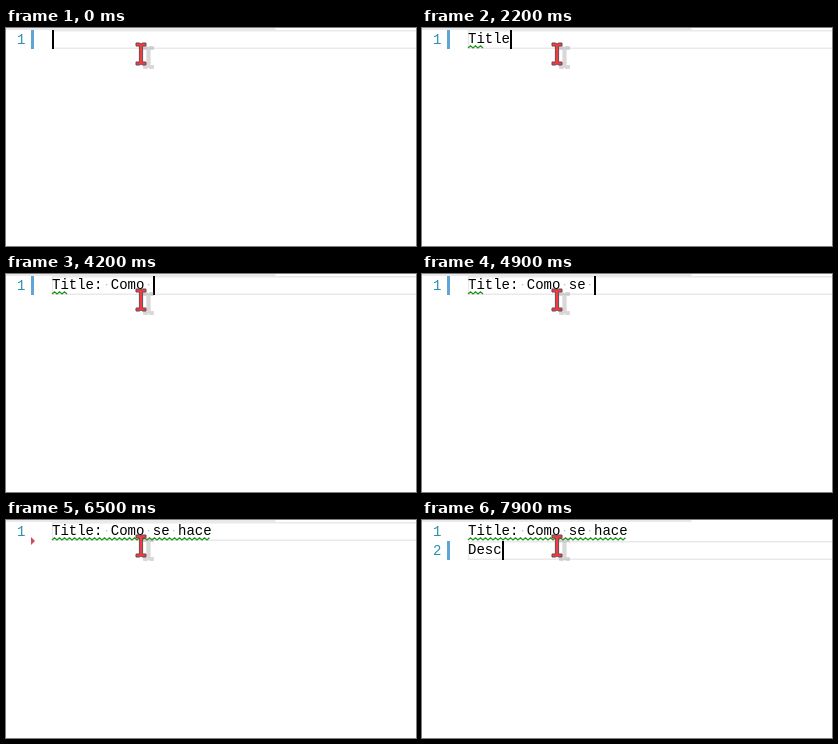
Recreate the animation shown at these times as an HTML page. Size 410x218 px, loop 8 s.

```html
<!DOCTYPE html>
<html lang="en">
<head>
<meta charset="utf-8">
<style>
  html, body { margin: 0; width: 100%; height: 100%; overflow: hidden; background: #fff; }
  svg { display: block; width: 100vw; height: 100vh; }
  text { font: 14px "Liberation Mono", monospace; white-space: pre; }
  .num { fill: #2b91af; }
</style>
</head>
<body>
<svg viewBox="0 0 410 218">
  <defs>
    <path id="beam" d="M0 0H3.5L5 1L6.500 0H10V3H6.600V19H10V22H6.500L5 21L3.500 22H0V19H3.400V3H0Z"/>
  </defs>
  <rect width="410" height="218" fill="#fff"/>
  <rect width="269.500" height="2" fill="#e9e9eb"/>
  <path id="line" d="M420 2.700H46.500V20.200H420" fill="none" stroke="#e9e9eb" stroke-width="1.400"/>
  <rect id="bar" x="25" width="3" height="19" fill="#5fa6d6"/>
  <path id="mark" d="M25 17L29 21L25 25Z" fill="#d0495c"/>
  <text class="num" x="11" y="16">1</text>
  <text class="num" id="num2" x="11" y="35">2</text>
  <g id="dots" fill="#a9c9d6"></g>
  <text id="row1" x="46" y="15"></text>
  <text id="row2" x="46" y="34"></text>
  <path id="wave" fill="none" stroke="#1c941c" stroke-width="1.200"/>
  <rect id="caret" width="2" height="19"/>
  <use href="#beam" x="137.500" y="18.500" fill="#777" stroke="#777" stroke-linejoin="round" opacity=".28"/>
  <use href="#beam" x="130" y="15" fill="#f23c42" stroke="#6b4a50" stroke-linejoin="round"/>
</svg>
<script>
const LOOP = 8000, LEFT = 46, CHAR = 8.4, ROW = 19;
const TITLE = "Title: Como se hace", DESC = "Desc";
// Time at which each character is typed
const titleKeys = [900, 1400, 1900, 2100, 2200, 2600, 3000, 3300, 3500, 3700,
  3900, 4200, 4500, 4700, 4900, 5400, 5600, 5800, 5900];
const descKeys = [7300, 7500, 7600, 7900];
const NEWLINE = 6600;
const caretOff = [[100, 600], [6400, NEWLINE], [7100, 7300]];

const el = id => document.getElementById(id);
const set = (id, name, value) => el(id).setAttribute(name, value);
const show = (id, on) => set(id, "visibility", on ? "visible" : "hidden");
const typed = (keys, t) => keys.filter(k => k <= t).length;
const within = (t, [from, to]) => t >= from && t < to;

function wavePath(chars) {
  const end = LEFT + chars * CHAR, points = [];
  for (let i = 0; LEFT + i * 2.5 <= end; i++)
    points.push(`${LEFT + i * 2.5} ${i % 2 ? 17.8 : 20}`);
  return chars ? "M" + points.join("L") : "";
}

function render(t) {
  const n1 = typed(titleKeys, t), n2 = typed(descKeys, t);
  const second = t >= NEWLINE, saved = within(t, [6100, 7500]);
  const top = second ? ROW : 0;

  el("row1").textContent = TITLE.slice(0, n1);
  el("row2").textContent = DESC.slice(0, n2);
  el("dots").innerHTML = [...TITLE.slice(0, n1)].map((c, i) => c === " "
    ? `<rect x="${LEFT + (i + .5) * CHAR - .7}" y="10" width="1.400" height="1.400"/>` : "").join("");
  set("wave", "d", wavePath(t < 2000 ? 0 : t < 5500 ? 2 : n1));

  set("line", "transform", `translate(0 ${top})`);
  show("num2", second);
  set("bar", "y", 2 + top);
  show("bar", !saved);
  show("mark", saved);

  set("caret", "x", Math.round(LEFT + (second ? n2 : n1) * CHAR));
  set("caret", "y", 2 + top);
  show("caret", !caretOff.some(span => within(t, span)));
}

const start = performance.now();
function tick() {
  render((performance.now() - start) % LOOP);
  requestAnimationFrame(tick);
}
tick();
</script>
</body>
</html>
```
